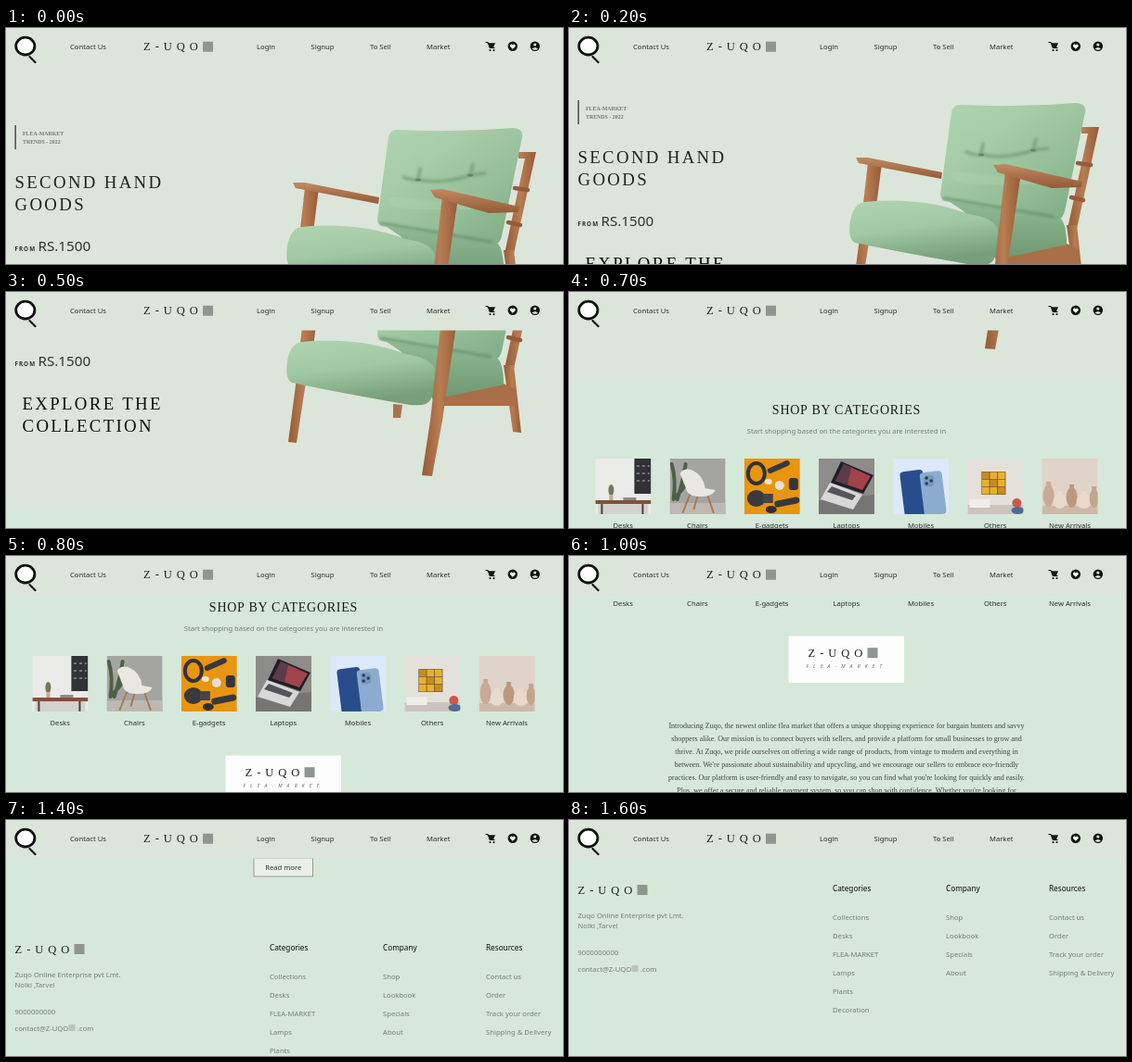
An HTML page for the animation above (2100 ms loop, 600 px wide and 255 px high).

```html
<!DOCTYPE html>
<html lang="en">
<head>
<meta charset="utf-8">
<title>Flea market</title>
<style>
  html, body { margin: 0; width: 100%; height: 100%; overflow: hidden; background: #d5e8da; }
  svg { display: block; }
  text { font: 7.65px "Noto Sans", "Open Sans", sans-serif; fill: #2b2f2c; white-space: pre; }
  .mid { text-anchor: middle; }
  .soft { fill: #757e78; }
  .lead { font-size: 7.55px; }
  .head { font-size: 8.2px; font-weight: 500; fill: #0c0f0d; }
  .brand, .big, .tag, .title, .story { font-family: "Liberation Serif", "Times New Roman", serif; }
  .brand { font-size: 12.5px; letter-spacing: 5px; fill: #1c1f1d; }
  .big { font-size: 18.8px; letter-spacing: 2.35px; fill: #1f2421; }
  .dark { fill: #0b0d0c; }
  .tag { font-size: 5.9px; font-weight: bold; fill: #737974; }
  .title { font-size: 14px; letter-spacing: .75px; fill: #191c1a; }
  .story { font-size: 8px; fill: #414743; }
  .from { font-size: 6.3px; font-weight: 600; letter-spacing: 1px; }
  .price { font-size: 15.2px; font-weight: 500; fill: #2f3330; }
  .sub { font-size: 5.2px; font-style: italic; letter-spacing: 5.1px; fill: #666; }
</style>
</head>
<body>
<svg id="stage" width="600" height="255" viewBox="0 0 600 255"></svg>
<script>
const text = (x, y, str, cls = '') =>
  `<text x="${x}" y="${y}" class="${cls}">${str.replace(/&/g, '&amp;')}</text>`;
const rect = (x, y, w, h, fill, extra = '') =>
  `<rect x="${x}" y="${y}" width="${w}" height="${h}" fill="${fill}" ${extra}/>`;
const oval = (x, y, rx, ry, fill, extra = '') =>
  `<ellipse cx="${x}" cy="${y}" rx="${rx}" ry="${ry}" fill="${fill}" ${extra}/>`;
const path = (d, fill, extra = '') => `<path d="${d}" fill="${fill}" ${extra}/>`;
const line = (d, color, width, extra = '') =>
  path(d, 'none', `stroke="${color}" stroke-width="${width}" stroke-linecap="round" ${extra}`);
const gradient = (id, x2, y2, ...colors) =>
  `<linearGradient id="${id}" x2="${x2}" y2="${y2}">` + colors.map((c, i) =>
    `<stop offset="${i / (colors.length - 1)}" stop-color="${c}"/>`).join('') + '</linearGradient>';
const brand = (x, y) => text(x, y, 'Z-UQO', 'brand') + rect(x + 64, y - 9.5, 11, 11, '#8f9691');

const defs = `<defs>
  ${gradient('back', .9, 1, '#b0d4b1', '#a6cca8', '#95bf98', '#80ab85')}
  ${gradient('seat', .3, 1, '#b0d4b2', '#a0c8a3', '#779f7b')}
  ${gradient('side', 0, 1, '#94be98', '#6d9872')}
  ${gradient('wood', 1, 0, '#935b37', '#b87d53', '#965a36')}
  ${gradient('arm', 0, 1, '#c08a62', '#945a37')}
  <filter id="blur" x="-30%" y="-30%" width="160%" height="160%"><feGaussianBlur stdDeviation="1.8"/></filter>
</defs>`;

const soft = 'filter="url(#blur)"';
const chair = [
  path('M552 134L571 134L547 244L537 244L559 141L552 141Z', 'url(#wood)'),
  line('M548 173L562 175M541 210L554 213', '#965c39', 4.5),
  path('M536 240L547 240L555 313L546 312Z', 'url(#wood)'),
  path('M417 282L427 283L425 297L417 297Z', '#a87450'),
  path('M468 270L536 260L549 266L549 284L468 284Z', '#a96f48'),
  path('M400 208L530 233Q536 240 536 261Q500 269 460 277L425 225Z', 'url(#side)'),
  path('M421 110Q480 113 545 108Q558 108 556 118L534 225Q531 237 520 234Q460 222 405 214Q398 212 401 200L412 118Q414 110 421 110Z', 'url(#back)'),
  line('M444 164L446 152M500 159L503 147M428 161Q436 165 444 164Q472 169 500 159L516 157', '#6d9873', 3.5, soft + ' opacity=".7"'),
  line('M418 186Q450 196 510 192', '#b5d8b7', 12, soft + ' opacity=".3"'),
  oval(444, 164, 3, 1.6, '#5f8966'), oval(500, 159, 3, 1.6, '#5f8966'),
  line('M404 211Q460 220 522 231', '#5f8966', 3, soft + ' opacity=".7"'),
  path('M322 172L337 173L331 220L322 265L313 324L304 323L312 262Z', 'url(#wood)'),
  path('M318 215Q380 209 430 228Q458 232 462 245L458 276Q455 285 435 283Q360 270 308 259Q300 255 303 236Q306 217 318 215Z', 'url(#seat)'),
  path('M309 167L322 167L402 183L401 190L312 173Z', 'url(#arm)'),
  path('M470 181L487 183L478 245L470 300L459 360L448 359L457 300Z', 'url(#wood)'),
  path('M457 175L470 174L553 193L552 199L520 200L462 183Z', 'url(#arm)'),
].join('');

const thumbs = [
  ['Desks', rect(0, 0, 60, 60, '#eaebe8') + rect(42, 0, 18, 38, '#303236') +
    line('M45 8H58M45 16H58M45 24H58', '#8a8c8e', 1.5, 'stroke-dasharray="2 4"') +
    oval(17, 34, 3, 6, '#6f7a58') + rect(15, 39, 4, 6, '#c9a88c') + rect(30, 42, 14, 3, '#8e8b86') +
    rect(0, 45, 60, 4, '#80513a') + rect(3, 49, 54, 11, '#d4d2ce') + rect(6, 49, 2, 11, '#50423b') + rect(50, 49, 2, 11, '#50423b')],
  ['Chairs', rect(0, 0, 60, 60, '#a4a5a2') + rect(0, 48, 60, 12, '#bdb8b2') +
    line('M4 44Q7 22 2 6M8 44Q14 26 17 6M6 42Q20 26 24 16', '#4d6046', 4) +
    line('M22 38L14 58M40 38L47 58M30 40L26 54', '#a97a52', 2) +
    path('M11 16Q16 9 25 13Q36 18 38 32L49 34Q46 42 30 41Q18 40 17 31Z', '#e9e7e2')],
  ['E-gadgets', rect(0, 0, 60, 60, '#e8950f') + oval(13, 16, 9, 11, 'none', 'stroke="#333238" stroke-width="4"') +
    line('M28 13L46 5', '#39383c', 6) + oval(38, 29, 5, 5, '#e4e0da') + oval(26, 25, 4, 3, '#eee4d4') +
    rect(48, 21, 10, 13, '#36353a', 'rx="3"') + oval(13, 43, 10, 9, '#3b393d') + rect(20, 38, 11, 10, '#46434a') +
    line('M36 49L56 45', '#39383c', 7) + oval(29, 55, 6, 4, '#302f33')],
  ['Laptops', rect(0, 0, 60, 60, '#8e8c8a') + path('M0 45L60 39V60H0Z', '#777574') +
    path('M24 3L59 18L48 38L13 26Z', '#211f27') + path('M27 6L56 19L47 34L18 24Z', '#a1434a') +
    path('M18 24L27 6L35 10L31 28Z', '#5b3a4c') + path('M12 26L47 39L37 55L2 44Z', '#d8d8d9') +
    path('M14 30L40 40L36 45L9 36Z', '#55545a')],
  ['Mobiles', rect(0, 0, 60, 60, '#dbe9fa') + rect(10, 13, 25, 50, '#294d8c', 'rx="4" transform="rotate(-7 22 40)"') +
    rect(31, 14, 24, 47, '#8cabd1', 'rx="4" transform="rotate(-7 43 38)"') + rect(33, 18, 11, 12, '#7896bd', 'rx="3"') +
    [[36, 21], [41, 24], [36, 27]].map(p => oval(...p, 1.8, 1.8, '#2d3e59')).join('')],
  ['Others', rect(0, 0, 60, 60, '#e4e0db') + rect(0, 50, 60, 10, '#cbc3bc') + rect(15, 14, 26, 25, '#5a5038') +
    [0, 1, 2, 3, 4, 5, 6, 7, 8].map(i => rect(15.5 + i % 3 * 8.5, 14.5 + (i / 3 | 0) * 8.2, 7.8, 7.6, i % 4 ? '#e7b02f' : '#c98a25')).join('') +
    rect(2, 44, 22, 9, '#efeeec') + oval(53, 48, 5, 5, '#ca5948') + oval(54, 56, 7, 4, '#4f6b96')],
  ['New Arrivals', rect(0, 0, 60, 60, '#e0d3c9') + rect(0, 51, 60, 9, '#cdb9aa') +
    [[7, 40, 6, 12, '#c9aa94'], [19, 46, 7, 8, '#e9dacd'], [32, 42, 6, 11, '#bd987f'], [45, 46, 8, 8, '#ead8ca'], [56, 43, 5, 10, '#c5a48d']]
      .map(([x, y, rx, ry, c]) => rect(x - 2.5, y - ry - 3, 5, 8, c) + oval(x, y, rx, ry, c)).join('')],
].map(([name, art], i) =>
  `<svg x="${28.4 + 80.2 * i}" y="478" width="60" height="60">${art}</svg>` +
  text(58.2 + 80.2 * i, 553.2, name, 'mid')).join('');

const story = [
  'Introducing Zuqo, the newest online flea market that offers a unique shopping experience for bargain hunters and savvy',
  'shoppers alike. Our mission is to connect buyers with sellers, and provide a platform for small businesses to grow and',
  'thrive. At Zuqo, we pride ourselves on offering a wide range of products, from vintage to modern and everything in',
  "between. We're passionate about sustainability and upcycling, and we encourage our sellers to embrace eco-friendly",
  "practices. Our platform is user-friendly and easy to navigate, so you can find what you're looking for quickly and easily.",
  "Plus, we offer a secure and reliable payment system, so you can shop with confidence. Whether you're looking for",
  'unique gifts, one-of-a-kind vintage finds, or simply want to support small businesses, Zuqo has something for everyone.',
  'Join our community today and discover the joy of online flea market shopping.',
].map((str, i) => text(299, 684.7 + 14 * i, str, 'story mid')).join('');

const columns = [
  [284, 'Categories', 'Collections', 'Desks', 'FLEA-MARKET', 'Lamps', 'Plants', 'Decoration'],
  [406, 'Company', 'Shop', 'Lookbook', 'Specials', 'About'],
  [517, 'Resources', 'Contact us', 'Order', 'Track your order', 'Shipping & Delivery'],
].map(([x, head, ...rows]) => text(x, 911, head, 'head') +
  rows.map((row, i) => text(x, 942 + 20 * i, row, 'soft')).join('')).join('');

const page = [
  rect(0, 0, 600, 396, '#dce5da'), chair,
  rect(9.5, 105, 1.3, 26, '#333'),
  text(18, 115.8, 'FLEA-MARKET', 'tag'), text(18, 125, 'TRENDS - 2022', 'tag'),
  text(9.5, 173, 'SECOND HAND', 'big'), text(9.5, 196.5, 'GOODS', 'big'),
  text(9.5, 241, 'FROM', 'from'), text(34.5, 241.3, 'RS.1500', 'price'),
  text(17.5, 288, 'EXPLORE THE', 'big dark'), text(17.5, 312, 'COLLECTION', 'big dark'),
  text(299, 430, 'SHOP BY CATEGORIES', 'title mid'),
  text(299, 451, 'Start shopping based on the categories you are interested in', 'soft lead mid'),
  thumbs,
  rect(236.5, 585.5, 124.5, 50.5, '#fdfdfd'), brand(257.5, 607.7), text(255.5, 619.5, 'FLEA-MARKET', 'sub'),
  story,
  rect(267, 811, 63.5, 20, '#eceeec', 'stroke="#8d948f" stroke-width=".9"'), text(298.7, 823.8, 'Read more', 'mid'),
  brand(9.5, 913.5),
  text(9.5, 939.5, 'Zuqo Online Enterprise pvt Lmt.', 'soft'), text(9.5, 951, 'Nolki ,Tarvel', 'soft'),
  text(9.5, 979.5, '9000000000', 'soft'), text(9.5, 997.5, 'contact@Z-UQO', 'soft'),
  rect(67.5, 991, 7, 7, '#b9c5bc'), text(77, 997.5, '.com', 'soft'),
  columns,
].join('');

const header = [
  rect(0, 0, 600, 41.5, '#dce5da'),
  oval(20.8, 19.6, 10.1, 9.4, '#fff', 'stroke="#111" stroke-width="2.8"'),
  line('M25.5 31L31.5 37', '#111', 2.2),
  brand(148, 24.2),
  ...[[69, 'Contact Us'], [270, 'Login'], [328.5, 'Signup'], [392, 'To Sell'], [453, 'Market']]
    .map(([x, str]) => text(x, 22.6, str)),
  line('M517 15.5H519L521.3 21.5H526', '#111', 1.2), path('M519.5 16.3H527L525 21H521.2Z', '#111'),
  oval(521.5, 24, 1.1, 1.1, '#111'), oval(525.5, 24, 1.1, 1.1, '#111'),
  oval(545.8, 19.8, 5.2, 5.2, '#111'),
  path('M545.8 22.8L543 19.9Q542.5 17.6 544.5 17.5Q545.4 17.6 545.8 18.4Q546.2 17.6 547.1 17.5Q549.1 17.6 548.6 19.9Z', '#fff'),
  oval(569.8, 19.8, 5.2, 5.2, '#111'),
  oval(569.8, 18, 1.6, 1.6, '#dce5da'), path('M566.6 22.4Q569.8 19.4 573 22.4Q569.8 25 566.6 22.4Z', '#dce5da'),
].join('');

document.getElementById('stage').innerHTML = `${defs}<g id="page">${page}</g>${header}`;

// Scroll offset for each 100 ms step: ease in, steady run, ease out, rest.
const STEP = 100, LOOP = 2100;
const scroll = [0, 0, 27, 67, 113, 161, 226, 298, 370, 435, 499, 569, 639, 709, 770, 812, 834];
const pageNode = document.getElementById('page');
const start = performance.now();

function draw() {
  const step = Math.floor((performance.now() - start) % LOOP / STEP);
  const offset = scroll[Math.min(step, scroll.length - 1)];
  pageNode.setAttribute('transform', `translate(0 ${-offset})`);
  requestAnimationFrame(draw);
}
draw();
</script>
</body>
</html>
```
